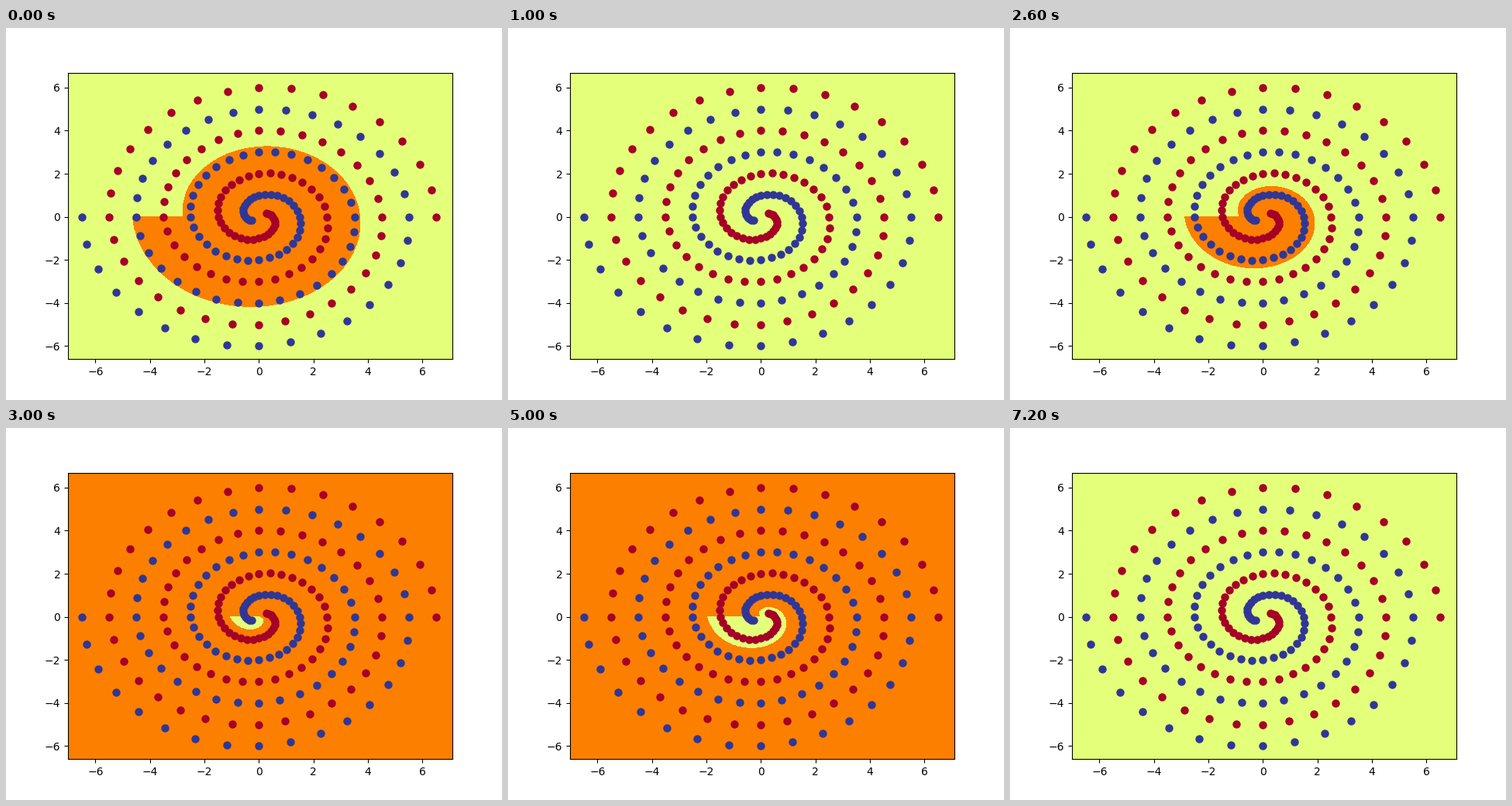
These frames come from a looping animation (640x480 px, 8 s). A matplotlib script:

```python
import numpy as np
import matplotlib.pyplot as plt
from matplotlib.animation import FuncAnimation

# Each hidden unit splits the plane along r + turn * theta = offset.
# (offset, turn, value inside, value outside); None leaves the plane uniform.
UNITS = [
    (3.715, 0.296, 1, 0),
    None,
    (1.88, 0.32, 1, 0),
    (-0.065, 0.36, 0, 1),
    (-0.065, 0.36, 1, 0),
    (0.87, 0.351, 0, 1),
    None,
    None,
]
STEP = 0.01
EXTENT = (-7.005, 7.095, -6.605, 6.695)

x = np.arange(-7, 7.095, STEP)
y = np.arange(-6.6, 6.695, STEP)
grid_x, grid_y = np.meshgrid(x, y)
radius = np.hypot(grid_x, grid_y)
# The small shift keeps the row at y = 0 on the upper side of the cut.
theta = np.arctan2(grid_y + 1e-9, grid_x)


def activation(unit):
    if unit is None:
        return np.zeros(radius.shape)
    offset, turn, inside, outside = unit
    return np.where(radius + turn * theta < offset, inside, outside)


def spiral(count=100):
    i = np.arange(count)
    r = 6.5 - i / 16
    angle = i * np.pi / 16
    return r * np.cos(angle), r * np.sin(angle)


fig, ax = plt.subplots(figsize=(6.4, 4.8), dpi=100)
plane = ax.imshow(activation(UNITS[0]), extent=EXTENT, origin="lower",
                  aspect="auto", interpolation="nearest",
                  cmap="Wistia", vmin=0, vmax=1)
px, py = spiral()
ax.scatter(px, py, color="#a50026", linewidths=1.5)
ax.scatter(-px, -py, color="#313695", linewidths=1.5)
ax.set_xlim(EXTENT[:2])
ax.set_ylim(EXTENT[2:])


def update(frame):
    plane.set_data(activation(UNITS[frame]))
    return (plane,)


anim = FuncAnimation(fig, update, frames=len(UNITS), interval=1000,
                     repeat=True, repeat_delay=0)
plt.show()
```
